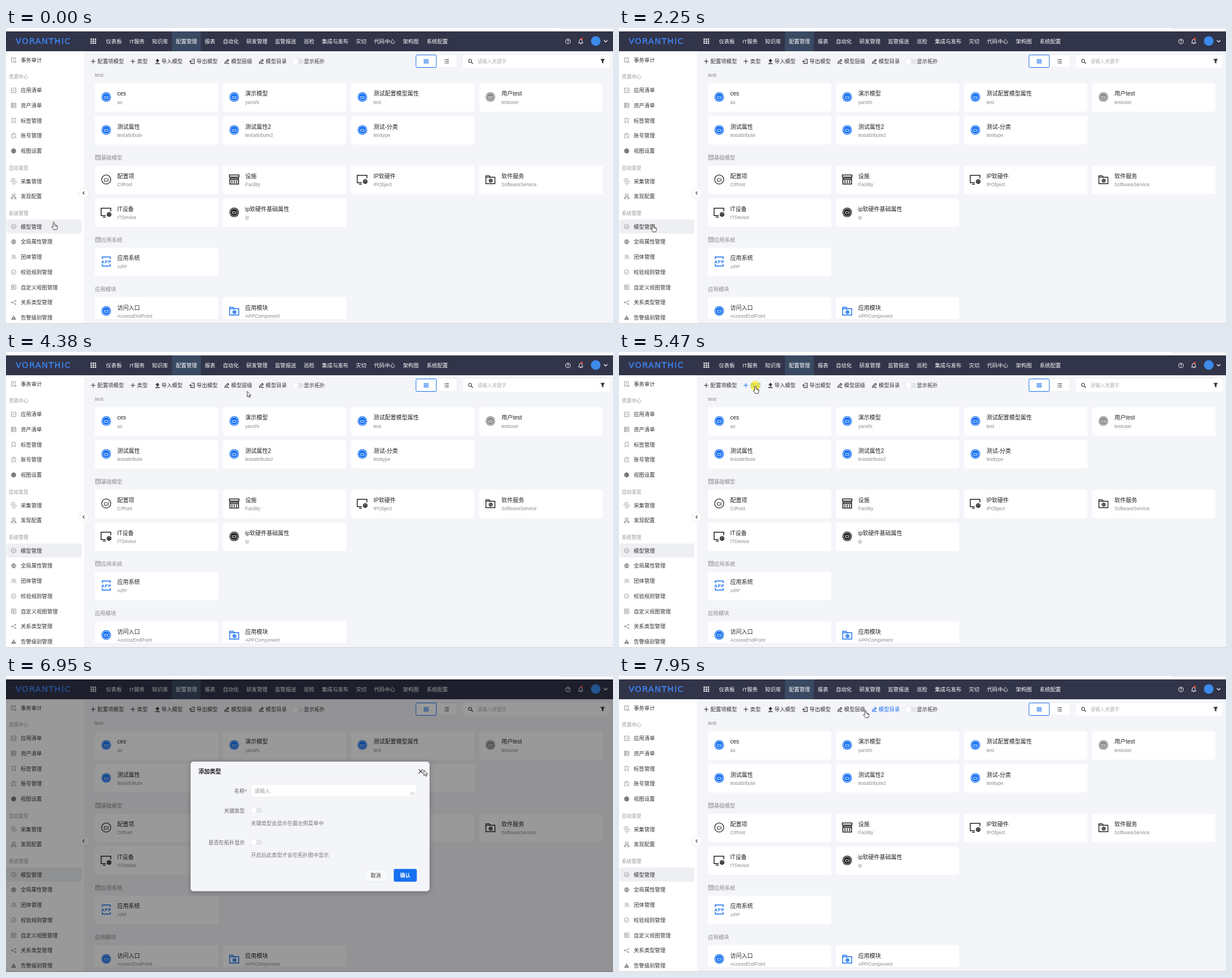
An HTML page that plays this animation: 1072 px wide and 522 px high, repeating every 8000 ms.

```html
<!DOCTYPE html>
<html lang="zh-CN">
<head>
<meta charset="utf-8">
<title>配置管理</title>
<style>
html, body { margin: 0; width: 100%; height: 100%; overflow: hidden; background: #fff; }
svg { display: block; width: 1072px; height: 522px; }
text { font-family: "Liberation Sans", "Noto Sans CJK SC", "Noto Sans CJK", sans-serif; white-space: pre; }
</style>
</head>
<body>
<svg id="stage" viewBox="0 0 1072 522" xmlns="http://www.w3.org/2000/svg"></svg>
<script>
const LOOP = 8000, BLUE = '#1670f0', PAGE = '#f4f5f9', INK = '#333';

// Drawing helpers: text is placed by its vertical centre.
const text = (x, y, s, size = 9.33, fill = INK, more = '') =>
  `<text x="${x}" y="${y + size * .365}" font-size="${size}" fill="${fill}" ${more}>${s}</text>`;
const rect = (x, y, w, h, fill, r = 0, more = '') =>
  `<rect x="${x}" y="${y}" width="${w}" height="${h}" rx="${r}" fill="${fill}" ${more}/>`;
const circle = (x, y, r, fill, more = '') => `<circle cx="${x}" cy="${y}" r="${r}" fill="${fill}" ${more}/>`;
const line = (x, y, d, color, w = .9, more = '') =>
  `<path transform="translate(${x} ${y})" d="${d}" fill="none" stroke="${color}" stroke-width="${w}" ${more}/>`;
const group = (id, body, more = '') => `<g id="${id}" ${more}>${body}</g>`;
const toggle = (x, y) => rect(x, y - 4.5, 20.5, 9, '#e3e5e8', 4.5) +
  circle(x + 5.5, y, 5.4, '#fff', 'stroke="#dfe1e5" stroke-width=".5"');

const box = 'M-4-4H4V4H-4Z', round = 'M-4 0A4 4 0 1 1 4 0A4 4 0 1 1-4 0Z';
const gear = 'M0-3.6L3.1-1.8V1.8L0 3.6L-3.1 1.8V-1.8ZM-1.2 0A1.2 1.2 0 1 1 1.2 0A1.2 1.2 0 1 1-1.2 0Z';
const icons = {
  audit: 'M-4-4H3V0M-4-4V4H0M-2-1.5H1M-2 1H0M1 2H4V4.5H1Z',
  app: 'M-4-1V-4H4V-1M-4 1V4H4V1M-5 0H5',
  asset: box + 'M-4-1.5H4M-4 1H4M-1.5-4V4',
  tag: 'M-2.8-4H2.8V4L0 1.7L-2.8 4Z',
  account: 'M-3.5-3H3.5V0M-3.5-3V4H0M-1.5-4.5H1.5M-1.5 0H1M1 4.5L2.5 1L4.5 4.5',
  collect: 'M-4 1A4 4 0 0 1 3-3M4-1A4 4 0 0 1-3 3M-2 0A2 2 0 1 1 2 0A2 2 0 1 1-2 0',
  discover: 'M-2.5-4H2.5V-1H-2.5ZM0-1V1M-3 3V1H3V3M-4.5 2.5H-1.5V4.5H-4.5ZM1.5 2.5H4.5V4.5H1.5Z',
  model: 'M0-4.3L3.8-2.2V2.2L0 4.3L-3.8 2.2V-2.2ZM-2-.8L0 .5L2-.8M0 .5V2.5',
  globe: round + 'M-4 0H4M0-4V4M-3.3-2H3.3M-3.3 2H3.3M0-4Q-4 0 0 4Q4 0 0-4',
  team: 'M-3-1.5A2 2 0 1 1 1-1.5A2 2 0 1 1-3-1.5M-4.5 4Q-1 -1 2.5 4M2-3.5Q4.3-1.5 2 .4Q4 1 4.5 3.5',
  check: round + 'M-2 0L-.5 1.5L2-1.3',
  view: box + 'M-2.2-2H0V0H-2.2ZM1.5-2V2H-2',
  share: 'M3.5-3L-3 0L3.5 3M2.5-3.8H4V-2.3H2.5ZM2.5 2.3H4V3.8H2.5ZM-4-.8H-2.5V.8H-4Z',
  plus: 'M-4 0H4M0-4V4',
  export: 'M-1.5-3.8H3.5V3.8H-2.5V2M-4.5 0H1.5M-2.5-2L-4.5 0L-2.5 2',
  pencil: 'M-3.2 1.5L1.8-3.5L3.5-1.8L-1.4 3.2L-3.6 3.5ZM0 3.8H4',
  close: 'M-3.6-3.6L3.6 3.6M3.6-3.6L-3.6 3.6',
  search: 'M-3.5-1A2.7 2.7 0 1 1 1.9-1A2.7 2.7 0 1 1-3.5-1M1 1L4 4',
  section: 'M-4.2-4H4.2V4H-4.2ZM-4.2-2.2H4.2M-2.8-.4H-1.6M-.6-.4H3M-2.8 1.8H-1.6M-.6 1.8H3'
};

function header() {
  const nav = [[176.5, '仪表板'], [218, 'IT服务'], [258, '知识库'], [300, '配置管理'], [351, '报表'], [383, '自动化'],
    [424.5, '研发管理'], [475, '监管报送'], [526, '巡检'], [558, '集成与发布'], [618, '灾切'], [650, '代码中心'],
    [701, '架构图'], [743, '系统配置']];
  let s = rect(0, 6, 1072, 35, '#323449') + rect(293, 6, 51, 35, '#3a4a62');
  s += text(17, 23, 'VORANTHIC', 14.5, '#3d86f2', 'style="font-family:\'DejaVu Sans\',sans-serif" letter-spacing="1.4" stroke="#3d86f2" stroke-width=".4"');
  for (let i = 0; i < 9; i++) s += rect(149.3 + i % 3 * 3.7, 18.6 + (i / 3 | 0) * 3.5, 2.5, 2.3, '#fff');
  s += nav.map(([x, label]) => text(x, 23.7, label, 9.33, '#fff')).join('');
  s += circle(992.5, 23.7, 4.1, 'none', 'stroke="#fff"') + text(992.6, 23.7, '?', 6.5, '#fff', 'text-anchor="middle" font-weight="bold"');
  s += line(1015, 23.7, 'M-3.8 2.8H3.8L2.7 1.2V-1Q2.5-3.6 0-3.6Q-2.5-3.6-2.7-1V1.2ZM-1 4.3H1', '#fff', 1);
  return s + circle(1016.8, 19, 1.9, '#f0483e') + circle(1041.5, 23, 8.5, '#3b8bea') +
    line(1059, 23.2, 'M-3-1.5L0 1.5L3-1.5', '#fff', 1.3);
}

function sidebar() {
  const rows = [[56.3, '事务审计', 'audit'], [86, '资源中心'], [110, '应用清单', 'app'], [136.5, '资产清单', 'asset'],
    [163.3, '标签管理', 'tag'], [190, '账号管理', 'account'], [216.8, '视图设置', 'cog'], [246.5, '自动发现'],
    [270.2, '采集管理', 'collect'], [296.8, '发现配置', 'discover'], [327, '系统管理'], [350.2, '模型管理', 'model'],
    [377, '全局属性管理', 'globe'], [403.7, '团体管理', 'team'], [430.5, '校验规则管理', 'check'],
    [457.2, '自定义视图管理', 'view'], [484, '关系类型管理', 'share'], [510.6, '告警级别管理', 'alarm']];
  let s = rect(0, 41, 137.5, 480, '#fff') + rect(1, 337.7, 132.5, 24.8, '#eeeff2', 4);
  for (const [y, label, icon] of rows) {
    if (!icon) { s += text(5, y, label, 8.6, '#999'); continue; }
    s += text(26, y, label);
    if (icon === 'cog') s += line(13.5, y, gear, '#777', 2);
    else if (icon === 'alarm') s += `<path d="M9 ${y + 4}L13.5 ${y - 4}L18 ${y + 4}Z" fill="#808080"/>` + line(13.5, y, 'M0-1.5V1.3M0 2V3', '#fff');
    else s += line(13.5, y, icons[icon], '#858585', .8);
  }
  return s + circle(137.5, 291, 8.7, '#fff', 'stroke="#dfe1e6" stroke-width=".7"') +
    line(137.3, 291, 'M1.2-2.6L-1.4 0L1.2 2.6', '#333', 1.1);
}

const tools = [[150, 208, '配置项模型', 'plus'], [220, 251, '类型', 'plus'], [263, 312, '导入模型', 'import'],
  [325, 373, '导出模型', 'export'], [386, 434, '模型层级', 'pencil'], [447, 495, '模型目录', 'pencil']];

function toolbar() {
  let s = tools.map(([x, , label, icon], i) => group('tool' + i,
    (icon === 'import'
      ? '<path d="M267.5 54.3L271.3 58.2H268.8V61H266.2V58.2H263.7ZM263.7 62H271.3V63.5H263.7Z" fill="currentColor"/>'
      : line(x + 4, 58.8, icons[icon], 'currentColor', 1.1)) + text(x + 11.6, 58.8, label, 9.33, 'currentColor'),
    `color="${INK}"`)).join('');
  s += toggle(505.5, 59) + text(526, 59, '显示拓扑');
  s += rect(760, 47.5, 36, 22, '#fff', 2, 'stroke="#e9ebef" stroke-width=".6"') +
    rect(724, 47.5, 36, 22, '#fff', 2, `stroke="${BLUE}" stroke-width="1"`);
  s += line(742, 58.7, 'M-3.7-3.4H-.7V-.7H-3.7ZM.8-3.4H3.8V-.7H.8ZM-3.7 .8H-.7V3.5H-3.7ZM.8 .8H3.8V3.5H.8Z', BLUE) +
    line(778, 58.7, 'M-2-3H4M-2 0H4M-2 3H4M-4-3H-3M-4 0H-3M-4 3H-3', '#333', 1);
  s += rect(807, 47.5, 259, 22.5, '#fff', 3) + line(820.5, 59, icons.search, '#333', 1.1) +
    text(832.5, 59, '请输入关键字', 8.55, '#aaaeb5');
  return s + '<path d="M1049.8 54.5H1057.6L1055 58.4V62.5L1052.4 61.3V58.4Z" fill="#333"/>';
}

// Card icons, centred on x, y.
const ci = color => (x, y) => circle(x, y, 8.4, color) + circle(x, y, 6.7, 'none', 'stroke="#fff" stroke-width=".8"') +
  text(x, y + .1, 'CI', 7.6, '#fff', 'text-anchor="middle" stroke="#fff" stroke-width=".2"');
const ciRing = (x, y) => circle(x, y, 8, 'none', 'stroke="#222" stroke-width="1.2"') +
  text(x, y + .1, 'CI', 9, '#222', 'text-anchor="middle" stroke="#222" stroke-width=".2"');
const rack = (x, y) => line(x, y, 'M-8.4-8H8.4V-4.5H-8.4ZM-7.6-2.5H7.6V8H-7.6ZM-7.6 .2H7.6M-4 2V6.5M0 2V6.5M4 2V6.5', '#222', 1.6);
const screen = (x, y) => line(x, y, 'M-1 5.5H-9V-7.5H8V-2M-6 8.3H-1', '#222', 1.5) + line(x + 5, y + 3.5, gear, '#222', 1.6, 'transform-origin="0 0"');
const folder = color => (x, y) => line(x, y, 'M-8-6.5H-2L0-4H8V7.3H-8ZM-8-3.8H0', color, 1.4) +
  `<g transform="translate(${x + .5} ${y + 2}) scale(.85)">${line(0, 0, gear, color, 1.5)}</g>`;
const appMark = (x, y) => line(x, y, 'M-7-4.5V-8H7V-4.5M-7 4.5V8H7V4.5', BLUE, 1.5) +
  text(x + .4, y + .2, 'APP', 7.8, BLUE, 'text-anchor="middle" font-weight="bold" letter-spacing=".8"');

function cards() {
  const blue = ci(BLUE), columns = [157, 383, 609.4, 835.5];
  const rows = [
    [97.5, ['ces', 'as', blue], ['演示模型', 'yanshi', blue], ['测试配置模型属性', 'test', blue], ['用户test', 'testuser', ci('#888')]],
    [155.6, ['测试属性', 'testattribute', blue], ['测试属性2', 'testattribute2', blue], ['测试-分类', 'testtype', blue]],
    [243, ['配置项', 'CIRoot', ciRing], ['设施', 'Facility', rack], ['IP软硬件', 'IPObject', screen], ['软件服务', 'SoftwareService', folder('#222')]],
    [301, ['IT设备', 'ITDevice', screen], ['ip软硬件基础属性', 'ip', ci('#222')]],
    [387.5, ['应用系统', 'APP', appMark]],
    [474.8, ['访问入口', 'AccessEndPoint', blue], ['应用模块', 'APPComponent', folder(BLUE)]]];
  let s = '';
  for (const [y, ...list] of rows) list.forEach(([title, name, icon], i) => {
    const x = columns[i];
    s += rect(x, y, 218, 50, '#fff', 4) + icon(x + 20, y + 24.2) +
      text(x + 39.5, y + 18.3, title, 10, '#222') + text(x + 39.5, y + 32.9, name, 8.5, '#8c8c8c');
  });
  for (const [x, y, label] of [[157, 83, 'test'], [168, 228.3, '基础模型'], [168, 373.2, '应用系统'], [157, 460.2, '应用模块']])
    s += text(x, y, label, 9.33, '#888') + (x > 160 ? line(162.5, y, icons.section, '#888') : '');
  return s;
}

const empty = () =>
  '<path d="M585 106H632L636 126H581Z" fill="#8ea9f5"/><path d="M582 124H636V158H582Z" fill="#7d9cf2"/>' +
  '<path d="M585 106L573 122L582 128L590 111ZM632 106L645 122L636 128L628 111Z" fill="#a9bdf7"/>' +
  [[556, 142], [598, 94], [606, 98], [634, 92], [648, 155], [570, 154]].map(([x, y]) => circle(x, y, 1.5, '#9db4f5')).join('') +
  text(588.5, 203.3, '暂无数据', 9.33, '#888');

function dialog() {
  let s = rect(326, 151, 422, 228.5, PAGE, 5, 'style="filter:drop-shadow(0 2px 5px rgba(0,0,0,.25))"');
  s += text(339.7, 168.7, '添加类型', 10, '#222', 'font-weight="bold"') + group('close', line(732.5, 168.2, icons.close, 'currentColor', 1.1));
  s += text(403, 202.2, '名称*', 9.33, '#666') + rect(432.5, 191, 293, 22.5, '#fff', 3, 'stroke="#e4e6ea" stroke-width=".7"') +
    text(439, 202.2, '请输入', 9.1, '#999') + text(713.5, 207.3, '30', 8, '#b5b5b5');
  s += text(385, 237.2, '关键类型', 9.2, '#666') + toggle(432, 237) + text(432.5, 259.2, '关键类型会显示在最左侧菜单中', 9.2, '#777');
  s += text(357.5, 293.5, '是否在拓扑显示', 9.2, '#666') + toggle(432, 293.3) + text(432.5, 315.4, '开启后此类型才会在拓扑图中显示', 9.2, '#777');
  return s + rect(633.3, 340.5, 40, 22, '#f7f8fa', 3, 'stroke="#e2e4e8" stroke-width=".7"') + text(644, 351.7, '取消', 9.1, '#333', 'font-weight="500"') +
    rect(684.8, 340.3, 40.7, 22.5, BLUE, 3) + text(696, 351.7, '确认', 9.1, '#fff', 'font-weight="bold"');
}

const pointer = group('mark', circle(0, 0, 8.5, '#ffee10', 'opacity=".7"')) +
  group('arrow', '<path d="M0 0V9.6L2.2 7.6L3.7 10.9L5.2 10.2L3.8 7H6.8Z"/>') +
  group('hand', '<path d="M-1.2 8.4V1.6A1.2 1.2 0 0 1 1.2 1.6V5.5Q2.5 4.5 3.1 5.8Q4.6 5.1 4.9 6.5Q6.2 6.2 6.2 7.6V9.6Q6 11.6 5 13.6H0Q-1.6 11-3.7 8.8Q-3.6 7-1.2 8.8ZM3.1 6V8M4.9 6.6V8.3"/>');

const stage = document.getElementById('stage');
stage.innerHTML = rect(0, 0, 1072, 522, '#fff') + rect(975, 0, 97, .7, '#d8d8d8') + rect(137.5, 41, 934.5, 480, PAGE) +
  '<clipPath id="list"><rect x="138" y="70" width="934" height="443"/></clipPath>' +
  toolbar() + group('cards', cards(), 'clip-path="url(#list)"') + group('empty', empty()) +
  group('loading', rect(137.5, 41, 934.5, 480, PAGE, 0, 'opacity=".92"') +
    group('spin', line(0, 0, 'M-4 4A5.6 5.6 0 1 1-1 5.5', BLUE, 1)) + text(593, 289.6, '加载中', 9.33, BLUE)) +
  sidebar() + header() + rect(0, 520.8, 1072, 1.2, '#d0d2d6') +
  group('modal', rect(0, 6, 1072, 516, '#000', 0, 'opacity=".4"') + dialog()) +
  group('cursor', pointer, 'fill="#fff" stroke="#111" stroke-width=".8" stroke-linejoin="round"');
const el = Object.fromEntries([...stage.querySelectorAll('[id]')].map(node => [node.id, node]));
el.mark.firstChild.setAttribute('stroke', 'none');

// Pointer moves: start, end, number of held positions, then the way points.
const moves = [
  [0, 0, 1, [84.5, 342]],
  [330, 330, 1, [82.5, 347]],
  [480, 710, 4, [76, 350], [41.5, 347]],
  [2030, 2110, 2, [47, 346.5], [52.5, 347]],
  [2250, 3050, 11, [60, 346], [120, 318], [200, 240], [284, 161]],
  [3430, 4220, 11, [272, 138], [274, 98], [295, 63], [375, 60], [430, 59], [466, 61]],
  [4290, 4930, 9, [452, 65], [400, 74], [320, 72], [260, 63], [240.7, 59.5]],
  [5640, 6420, 11, [240.7, 59.5], [330, 82], [540, 125], [702, 155]],
  [6500, 6550, 2, [724, 162], [738, 166]],
  [6950, 7410, 7, [738, 166], [690, 138], [570, 82], [487, 61]],
  [7570, 7570, 1, [486.5, 61.5]],
  [7950, 7950, 1, [435.3, 60]]];

function pointerAt(t) {
  const [start, end, count, ...points] = moves.filter(m => t >= m[0]).pop();
  if (count === 1) return points[0];
  const step = Math.min(count - 1, Math.floor((t - start) / (end - start) * (count - 1) + .01));
  const u = step / (count - 1) * (points.length - 1), i = Math.min(points.length - 2, Math.floor(u));
  return points[i].map((v, axis) => v + (points[i + 1][axis] - v) * (u - i));
}

const within = (t, a, b) => t >= a && t < b;
const show = (node, on) => node.style.display = on ? '' : 'none';

function draw(t) {
  const [x, y] = pointerAt(t);
  const loading = within(t, 1020, 1410), modal = within(t, 5640, 7190);

  let hover = -1;
  if (within(t, 7340, LOOP)) hover = 5;
  else if (within(t, 5640, 5710)) hover = 1;
  else if (!modal && y > 50 && y < 69) hover = tools.findIndex(([a, b]) => x >= a && x <= b);
  tools.forEach((_, i) => el['tool' + i].setAttribute('color', i === hover ? BLUE : INK));

  show(el.cards, !loading);
  show(el.empty, loading);
  show(el.loading, loading);
  el.loading.style.opacity = t < 1100 ? .5 : 1;
  el.spin.setAttribute('transform', `translate(607 276) rotate(${(t - 1330) * .36})`);

  show(el.modal, modal);
  el.modal.style.opacity = t < 6960 ? 1 : Math.max(0, 1 - (t - 6960) / 230);
  el.close.setAttribute('color', within(t, 6550, 7200) ? '#222' : '#555');

  const hand = (x < 134 && y > 337) || (hover >= 0 && !modal) || within(t, 6550, 6950);
  show(el.hand, hand);
  show(el.arrow, !hand);
  show(el.mark, within(t, 870, 1020) || within(t, 5470, 5640) || within(t, 6870, 6950));
  el.cursor.setAttribute('transform', `translate(${x} ${y})`);
}

const begin = performance.now();
function tick() {
  draw((performance.now() - begin) % LOOP);
  requestAnimationFrame(tick);
}
tick();
</script>
</body>
</html>
```
